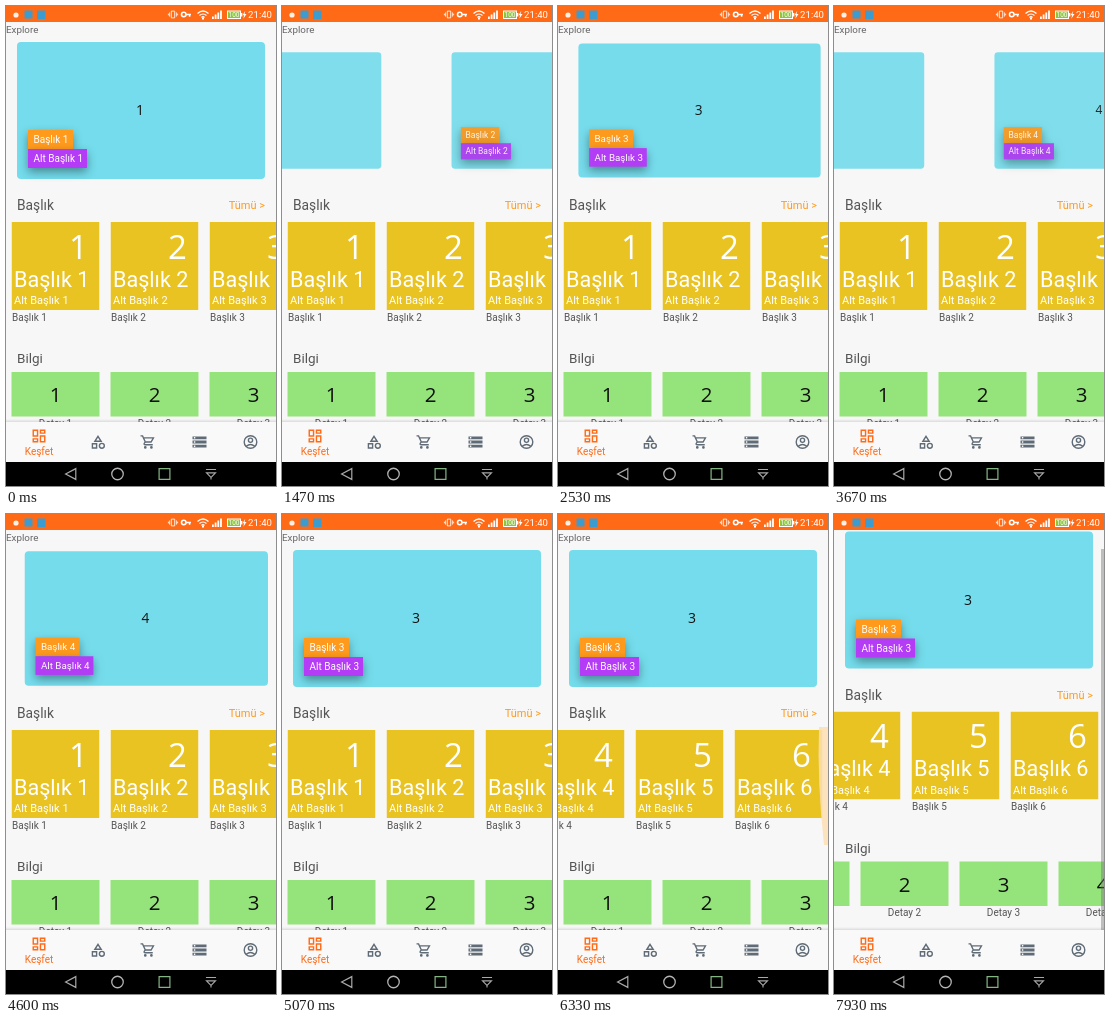
Recreate the animation shown at these times as an HTML page with a canvas. Size 270 by 480 pixels, loop 8000 ms.

```html
<!DOCTYPE html>
<html lang="tr">
<head>
<meta charset="utf-8">
<style>
html, body { margin: 0; width: 100%; height: 100%; overflow: hidden; background: #f8f7f7 }
canvas { display: block; width: 270px; height: 480px }
</style>
</head>
<body>
<canvas id="stage"></canvas>
<script>
const LOOP = 8000, W = 270, H = 480;
const canvas = document.getElementById('stage'), c = canvas.getContext('2d');
const dpr = window.devicePixelRatio || 1;
canvas.width = W * dpr;
canvas.height = H * dpr;

const ROBOTO = 'Roboto, sans-serif', OPEN = '"Open Sans", sans-serif';
const BG = '#f8f7f7', ORANGE = '#ff6a16', GRAY = '#5f6b76';

// Eased 0..1 progress of a move between two times.
function move(t, from, to) {
  const u = Math.min(1, Math.max(0, (t - from) / (to - from)));
  return u * u * (3 - 2 * u);
}

function box(x, y, w, h, color) {
  c.fillStyle = color;
  c.fillRect(x, y, w, h);
}

function text(s, x, y, size, color, align = 'left', font = ROBOTO) {
  c.font = `${size}px ${font}`;
  c.fillStyle = color;
  c.textAlign = align;
  c.fillText(s, x, y);
}

function clipped(x, y, w, h, draw) {
  c.save();
  c.beginPath();
  c.rect(x, y, w, h);
  c.clip();
  draw();
  c.restore();
}

// Icon paths use a 24 unit grid centred on (x, y).
function icon(d, x, y, scale, color, filled, weight = 2) {
  c.save();
  c.translate(x, y);
  c.scale(scale, scale);
  c.translate(-12, -12);
  c.fillStyle = c.strokeStyle = color;
  c.lineWidth = weight;
  const path = new Path2D(d);
  filled ? c.fill(path, 'evenodd') : c.stroke(path);
  c.restore();
}

function tag(s, y, w, color) {
  c.save();
  c.shadowColor = 'rgba(0,0,0,.38)';
  c.shadowBlur = 10 * dpr;
  c.shadowOffsetY = 4 * dpr;
  box(-113, y, w, 19, color);
  c.restore();
  text(s, -107.5, y + 13, 10, '#fff');
}

function slide(n, offset) {
  if (Math.abs(offset) >= 1) return;
  const scale = Math.max(.85, 1 - Math.abs(offset));
  c.save();
  c.globalAlpha = .9 + (scale - .85) / .15 * .1;
  c.translate(135 + offset * 281, 104.5);
  c.scale(scale, scale);
  c.fillStyle = '#74dcec';
  c.beginPath();
  c.roundRect(-124, -68.5, 248, 137, 4);
  c.fill();
  text(n, -1, 4.5, 14, '#111', 'center', OPEN);
  tag('Başlık ' + n, 19.5, 45, '#ff9a1c');
  tag('Alt Başlık ' + n, 38.5, 59, '#b43cf6');
  c.restore();
}

function carousel(t) {
  const page = 1 + move(t, 1100, 1840) + move(t, 2080, 2576)
    + move(t, 3420, 3900) - move(t, 4560, 5060);
  for (let n = 1; n <= 4; n++) slide(n, n - page);
}

function titleCards(t) {
  const scroll = 324 * move(t, 5490, 6220);
  for (let n = 1; n <= 6; n++) {
    const x = 5.5 + 99 * (n - 1) - scroll;
    clipped(x, 216, 88, 88, () => {
      box(x, 216, 88, 88, '#e9c322');
      text(n, x + 67, 252.5, 33, '#fff', 'center', OPEN);
      text('Başlık ' + n, x + 2.5, 280.5, 21.6, '#fff');
      text('Alt Başlık ' + n, x + 2.5, 298, 11, '#fff');
    });
    text('Başlık ' + n, x + .5, 314.5, 10, '#555');
  }
  const glow = move(t, 6130, 6230) * (1 - move(t, 6350, 6650));
  if (glow) {
    c.globalAlpha = glow * .85;
    c.fillStyle = '#fde0b4';
    c.fill(new Path2D('M270 213H261Q259 268 266 331H270Z'));
    c.globalAlpha = 1;
  }
}

function detailCards(t) {
  const scroll = 78 * move(t, 6350, 7150);
  for (let n = 1; n <= 6; n++) {
    const x = 5.5 + 99 * (n - 1) - scroll;
    box(x, 366, 88, 44.5, '#95e47b');
    text(n, x + 44, 396, 20.5, '#111', 'center', OPEN);
    text('Detay ' + n, x + 44, 420.5, 10, '#555', 'center');
  }
}

function content(t) {
  const scroll = 18.5 * move(t, 7230, 7620);
  c.save();
  c.translate(0, -scroll);
  text('Explore', 0, 27, 9.8, '#666');
  carousel(t);
  text('Başlık', 11, 204, 13.8, '#555');
  text('Tümü >', 259, 203, 11, '#ff9a1c', 'right');
  titleCards(t);
  text('Bilgi', 11, 357, 13.5, '#555');
  detailCards(t);
  c.restore();
  c.globalAlpha = move(t, 7230, 7300);
  box(267, 16.5 + scroll, 3, 381, 'rgba(110,110,110,.42)');
  c.globalAlpha = 1;
}

function statusBar() {
  box(0, 0, W, 16, ORANGE);
  c.fillStyle = '#fff0e6';
  c.beginPath();
  c.arc(10, 9, 2.6, 0, 7);
  c.fill();
  box(18.5, 4.5, 8, 8, '#3c9cd0');
  box(31, 4.5, 8.5, 8.5, '#3c9cd0');
  icon('M8 4h8v16H8zM4 7v10M20 7v10M1 10v4M23 10v4', 167, 8.5, .42, '#fff');
  icon('M12 12a5 5 0 1 0-10 0a5 5 0 1 0 10 0M12 12H23M20 12v5', 180, 8.5, .45, '#fff', false, 3.5);
  icon('M1 9Q12-1 23 9M5 13Q12 7 19 13M9 17Q12 14 15 17', 197, 9, .5, '#fff', false, 2.4);
  icon('M10 18h4v3h-4z', 197, 9, .5, '#fff', true);
  for (let i = 0; i < 4; i++) box(206 + 2.7 * i, 10.5 - 2 * i, 1.8, 2.5 + 2 * i, '#fff');
  box(221, 4.5, 14, 8.5, '#fff');
  box(222, 5.5, 12, 6.5, '#8cc63c');
  box(235, 7, 1.3, 3.5, '#fff');
  text('100', 228, 11.3, 6.5, '#fff', 'center');
  icon('M14 2L7 13h4l-2 9 8-12h-5z', 238.5, 8.8, .4, '#fff', true);
  text('21:40', 266, 12.3, 9.6, '#fff', 'right');
}

function tabBar() {
  const shade = c.createLinearGradient(0, 413, 0, 416.5);
  shade.addColorStop(0, 'rgba(0,0,0,0)');
  shade.addColorStop(1, 'rgba(0,0,0,.13)');
  box(0, 413, W, 3.5, shade);
  box(0, 416, W, 40, '#f9f9f9');
  icon('M4 4h6v8H4zM14 4h6v4h-6zM14 12h6v8h-6zM4 16h6v4H4z', 33, 430, .72, ORANGE);
  text('Keşfet', 33, 448.5, 10, ORANGE, 'center');
  icon('M12 4L16.5 11H7.5ZM4 14.5h6v6H4zM21 17.5a3.5 3.5 0 1 0-7 0a3.5 3.5 0 1 0 7 0', 92, 436, .7, GRAY);
  icon('M1 3h3l4 9-1.5 2q-1 2 1.5 2H19M5.5 6H20l-3.5 6H8', 142, 436, .68, GRAY);
  icon('M6 20a2 2 0 1 0 4 0a2 2 0 1 0-4 0M15 20a2 2 0 1 0 4 0a2 2 0 1 0-4 0', 142, 436, .68, GRAY, true);
  icon([4, 10, 16].map(y => `M2 ${y}h20v4H2zM4 ${y + 1}h2v2H4z`).join(''), 193.5, 436, .7, GRAY, true);
  icon('M21 12a9 9 0 1 0-18 0a9 9 0 1 0 18 0M15 9.5a3 3 0 1 0-6 0a3 3 0 1 0 6 0M6 18Q12 13 18 18',
    244.5, 436, .7, GRAY);
}

function systemBar() {
  box(0, 456, W, 24, '#000');
  icon('M3 12L20 3V21Z', 65, 468, .6, '#a8a8a8');
  icon('M21 12a9 9 0 1 0-18 0a9 9 0 1 0 18 0', 111.5, 468, .64, '#b4b4b4');
  icon('M3 3h18v18H3z', 158.5, 468, .6, '#83b583');
  icon('M3 4H21M4 10H20L12 18ZM12 18V22', 205, 468, .56, '#a8a8a8');
}

function frame(now) {
  const t = now % LOOP;
  c.setTransform(dpr, 0, 0, dpr, 0, 0);
  box(0, 0, W, H, BG);
  clipped(0, 16, W, 400, () => content(t));
  statusBar();
  tabBar();
  systemBar();
  requestAnimationFrame(frame);
}
requestAnimationFrame(frame);
</script>
</body>
</html>
```
